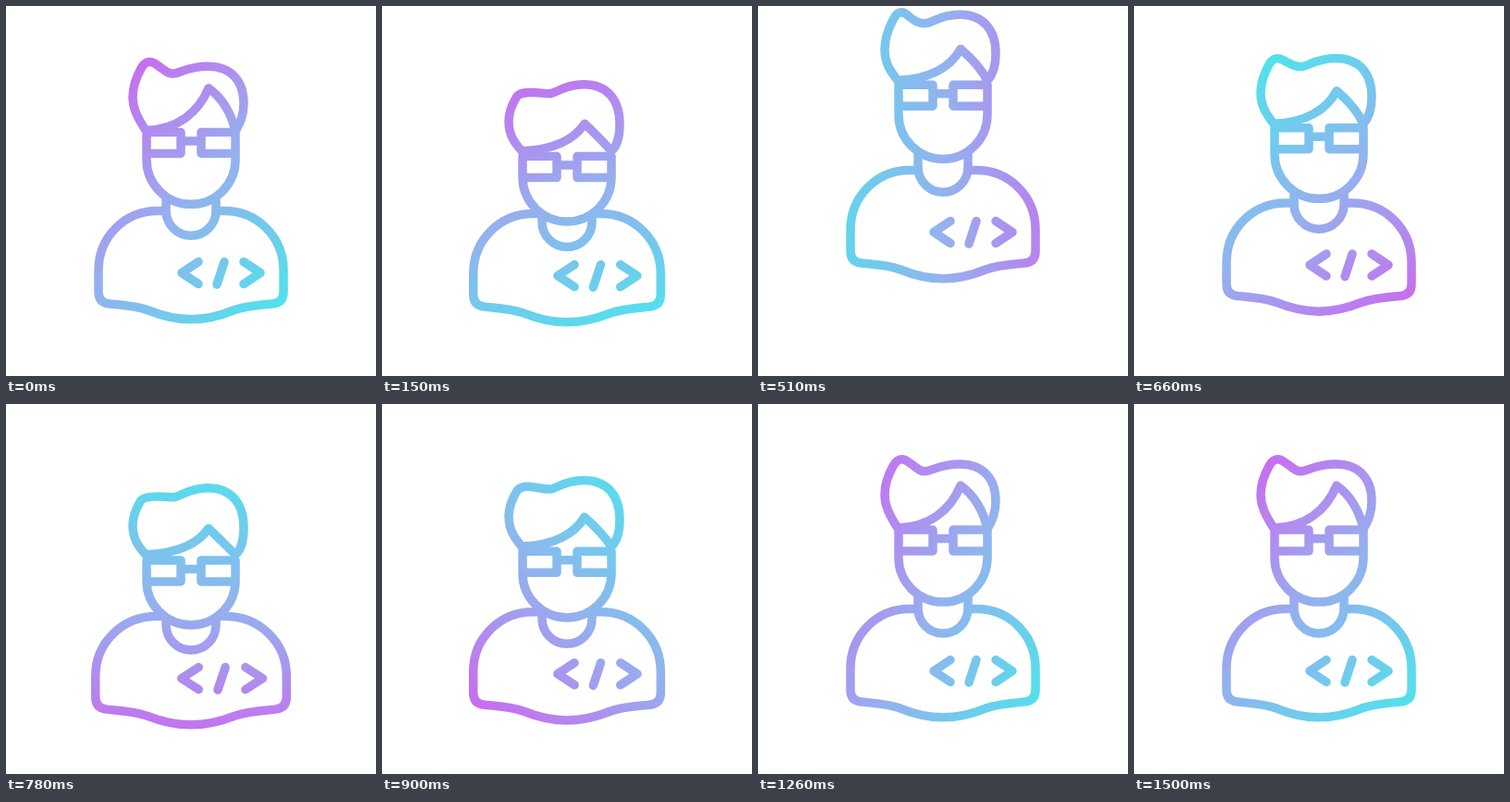
These frames come from a looping animation (400 px wide and 400 px high, 2530 ms). An HTML page with a canvas:

```html
<!DOCTYPE html>
<html lang="en">
<head>
<meta charset="utf-8">
<title>Jumping developer</title>
<style>
html, body { margin: 0; width: 100%; height: 100%; overflow: hidden; background: #fff; }
canvas { display: block; width: 400px; height: 400px; }
</style>
</head>
<body>
<canvas id="stage" width="400" height="400"></canvas>
<script>
const ctx = document.getElementById('stage').getContext('2d');
const LOOP = 2530, STEP = 30, MOVE = 1500;
const TAKEOFF = 280, LANDING = 680;
const { PI, sin, cos, exp, sqrt, max, min, floor } = Math;

const torso = new Path2D(
  'M171 221.5H164C128 221.5 100 250 100 286V309Q100 321 112 322' +
  'C128 323.5 140 324 154 329C186 342 214 342 246 329C260 324 272 323.5 288 322' +
  'Q300 321 300 309V286C300 250 272 221.5 236 221.5H229' +
  'M208 276.5L190 288.5L208 300.5M236 276.5L228 301M257 276.5L275 288.5L257 300.5');

const glasses = new Path2D('M152 136H189V159H152ZM211 136H248V159H211ZM189 145.5H211');

// quiff squashes the left lock, flat levels the rest of the hair.
function hair(quiff, flat) {
  const base = 134 - 4 * flat, end = 135 - 5 * flat, top = 65 - 7 * flat, dip = 72.5 - 4.5 * flat;
  return new Path2D(`M151 ${base}C142 120 137 ${110 + 2 * flat} 137 98
    C137 ${86 + 2 * quiff} 141 ${76 + 3 * quiff} 146 ${67 + 4 * quiff}
    C150 ${59 + 8 * quiff} 156 ${57.5 + 9.5 * quiff} 163 ${63 + 4 * quiff}
    C171 ${68 - quiff} 175 ${74 - 6 * flat} 182 ${dip}
    C189 ${dip - 1} 198 ${top} 218 ${top}
    C243 ${top} 257 ${80 - 6 * flat} 257 ${105 - 4 * flat}
    C257 ${118 - 2 * flat} 253 126 248 ${end}
    M151 ${base}C185 ${base - 1} 208 ${115 + 3 * flat} 219 ${88 + 13 * flat}
    C233 ${98 + 16 * flat} 243 ${113 + 12 * flat} 248 ${end}`);
}

const bell = (t, mid, width) => exp(-(((t - mid) / width) ** 2));

// Height of the jump, 0 on the ground and 1 at the top.
function liftAt(t) {
  const u = (t - TAKEOFF) / (LANDING - TAKEOFF);
  return max(0, 4 * u * (1 - u));
}

// Crouch, ballistic jump, damped bounce.
function bodyAt(t) {
  if (t < TAKEOFF) return 8 * sin(PI * (t / TAKEOFF) ** 3.3);
  if (t < LANDING) return -45 * liftAt(t);
  const s = t - LANDING;
  return 15 * exp(-s / 200) * sin(PI * s / 285);
}

function angleAt(t) {
  const u = (t / MOVE) ** .82;
  return PI * (1.26 + 2 * u * u * (3 - 2 * u));
}

function gradient(angle, cy) {
  const dx = 152 * cos(angle), dy = 152 * sin(angle);
  const paint = ctx.createLinearGradient(200 + dx, cy + dy, 200 - dx, cy - dy);
  ['#c86cf0', '#93b2ee', '#50e2ec'].forEach((c, i) => paint.addColorStop(i / 2, c));
  return paint;
}

function draw(now) {
  const t = min(floor(now % LOOP / STEP) * STEP, MOVE);
  const body = bodyAt(t), lift = liftAt(t);
  const nod = 28 * (bell(t, 190, 95) + bell(t, 825, 130)) - 7 * lift;
  const head = body + nod, jaw = body + .68 * nod, collar = body + .4 * nod;
  const quiff = nod / 24, flat = quiff + sqrt(lift);
  const sx = 1 + .004 * max(0, body);

  const shape = new Path2D();
  const add = (path, y, s = 1) =>
    shape.addPath(path, new DOMMatrix([s, 0, 0, 1, 200 - 200 * s, y]));
  add(torso, body, sx);
  add(glasses, head);
  add(hair(quiff, flat), head);
  add(new Path2D(
    `M152 ${136 + head}V${166 + jaw}A48 48 0 0 0 248 ${166 + jaw}V${136 + head}
     M173 ${206 + jaw}V${221 + collar}A27 27 0 0 0 227 ${221 + collar}V${206 + jaw}`), 0);

  ctx.fillStyle = '#fff';
  ctx.fillRect(0, 0, 400, 400);
  ctx.strokeStyle = gradient(angleAt(t), 212 + body / 2);
  ctx.lineWidth = 9.5;
  ctx.lineCap = ctx.lineJoin = 'round';
  ctx.stroke(shape);
}

function tick(now) {
  draw(now);
  requestAnimationFrame(tick);
}
draw(0);
requestAnimationFrame(tick);
</script>
</body>
</html>
```
